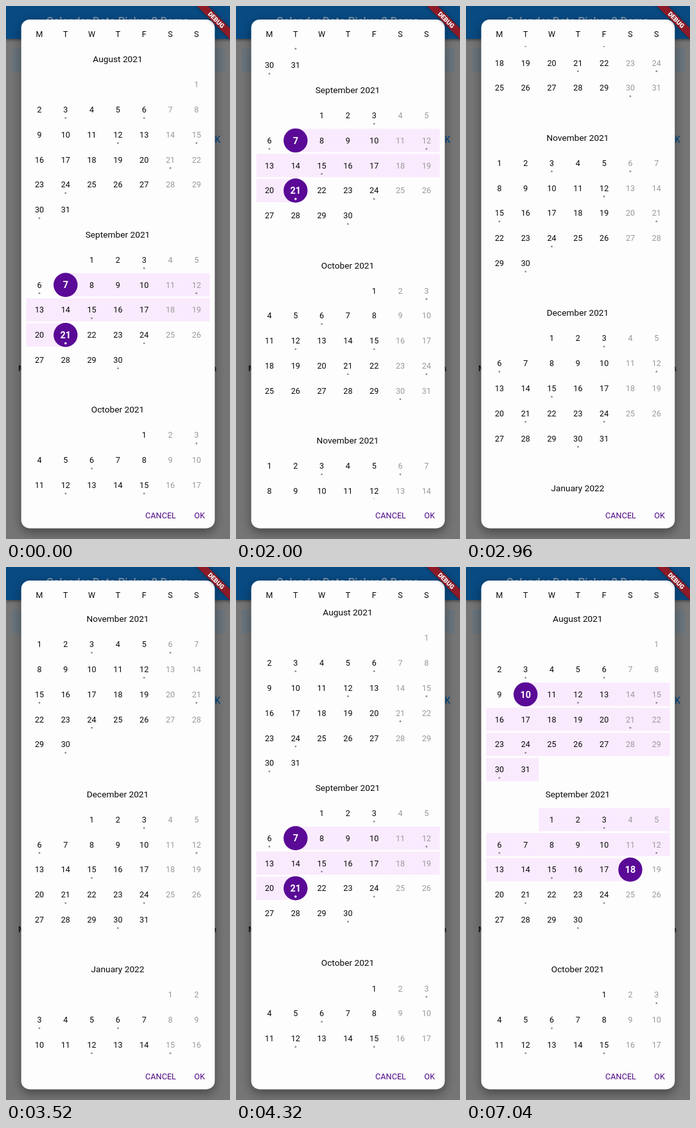
Animation, 349 px wide and 826 px high, one loop 7.2 s. Source, as an HTML page with a canvas:

```html
<!DOCTYPE html>
<html lang="en">
<head>
<meta charset="utf-8">
<title>Range calendar</title>
<style>
  html, body { margin: 0; width: 100%; height: 100%; overflow: hidden; background: #757576; }
  canvas { display: block; }
</style>
</head>
<body>
<canvas id="stage" width="349" height="826"></canvas>
<script>
const ctx = document.getElementById('stage').getContext('2d');
const LOOP = 7200, STEP = 80;
const ROW = 38.8, MONTH = ROW * 7, COL = 40.8, LEFT = 52;
const INK = '#0a0a0c', FAINT = '#9a9a9d', PURPLE = '#5a0a96', BAND = '#faeafd';

// Scroll flings: start, end, from, to, ease-out power
const flings = [
  [1520, 2400, 83, -239.7, 1.5],
  [2400, 3520, -239.7, -733.8, 2],
  [3520, 4486, -733.8, 81, 2.5]
];

// Selected ranges: time set, first day, last day
const day = (month, date) => +new Date(2021, month, date);
const ranges = [
  [0, day(8, 7), day(8, 21)],
  [4960, day(7, 10), day(7, 10)],
  [5920, day(7, 10), day(8, 18)]
];

function scrollAt(t) {
  let y = 83;
  for (const [start, end, from, to, power] of flings) {
    if (t < start) break;
    const s = Math.min(1, (t - start) / (end - start));
    y = from + (to - from) * (1 - (1 - s) ** power);
  }
  return y;
}

function rect(x, y, w, h, color) {
  ctx.fillStyle = color;
  ctx.fillRect(x, y, w, h);
}

function disc(x, y, r, color) {
  ctx.fillStyle = color;
  ctx.beginPath();
  ctx.arc(x, y, r, 0, Math.PI * 2);
  ctx.fill();
}

// Text with its capitals centred on y
function label(text, x, y, size, color, weight = 400, align = 'center') {
  ctx.font = `${weight} ${size}px Roboto, sans-serif`;
  ctx.textAlign = align;
  ctx.fillStyle = color;
  ctx.fillText(text, x, y + size * 0.356);
}

function drawPage() {
  rect(0, 0, 349, 826, '#757576');
  rect(9, 66, 332, 37, '#6a747c');
  label('OK', 334, 207, 14, '#0b497f', 500, 'right');
  label('M', 19, 561, 13.5, '#111', 500, 'left');
  label('n', 328, 561, 13.5, '#111', 500, 'right');
  ctx.save();
  ctx.shadowColor = 'rgba(0,0,0,.4)';
  ctx.shadowBlur = 4;
  ctx.shadowOffsetY = 2;
  rect(0, 0, 349, 51, '#084a82');
  ctx.restore();
  label('Calendar Date Picker 2 Demo', 174, 23, 17, '#8296a9', 500);
}

function drawDialog() {
  ctx.save();
  ctx.shadowColor = 'rgba(0,0,0,.4)';
  ctx.shadowBlur = 16;
  ctx.shadowOffsetY = 6;
  ctx.fillStyle = '#fdfdfe';
  ctx.beginPath();
  ctx.roundRect(23.7, 21, 301.6, 788.4, 13);
  ctx.fill();
  ctx.restore();
  [...'MTWTFSS'].forEach((c, i) => label(c, LEFT + i * COL, 44, 12.5, INK));
  label('CANCEL', 241, 789.5, 12.7, '#500a85');
  label('OK', 301.5, 789.5, 12.7, '#500a85');
}

function drawDay(date, x, y, first, last) {
  const time = +date, n = date.getDate();
  const picked = time === first || time === last;
  if (time >= first && time <= last && first !== last) {
    const from = time === first ? x : x - COL / 2;
    const to = time === last ? x : x + COL / 2;
    rect(from, y - 18, to - from + 0.3, 36, BAND);
  }
  if (picked) {
    disc(x, y, 18.7, PURPLE);
    label(n, x, y, 14.5, '#fff', 700);
  } else {
    label(n, x, y, 12.6, date.getDay() % 6 ? INK : FAINT);
  }
  if (n % 3 === 0 && n % 9) disc(x, y + 13, picked ? 1.8 : 1.4, picked ? '#fff' : '#8c8c8f');
}

function drawMonth(index, top, first, last) {
  const start = new Date(2021, 7 + index, 1);
  const title = start.toLocaleDateString('en-US', { month: 'long', year: 'numeric' });
  label(title, 174, top - 0.7, 13.7, INK);
  const offset = (start.getDay() + 6) % 7;
  const count = new Date(2021, 8 + index, 0).getDate();
  for (let n = 1; n <= count; n++) {
    const cell = offset + n - 1;
    const x = LEFT + cell % 7 * COL, y = top + ROW * (1 + Math.floor(cell / 7));
    drawDay(new Date(2021, 7 + index, n), x, y, first, last);
  }
}

function drawCalendar(t) {
  const [, first, last] = ranges.filter(r => r[0] <= t).pop();
  const scroll = scrollAt(t);
  ctx.save();
  ctx.beginPath();
  ctx.rect(24, 62, 301, 702);
  ctx.clip();
  for (let i = 0; i < 7; i++) {
    const top = scroll + i * MONTH;
    if (top > -MONTH && top < 780) drawMonth(i, top, first, last);
  }
  ctx.restore();
}

function drawBanner() {
  ctx.save();
  ctx.translate(349, 0);
  ctx.rotate(Math.PI / 4);
  ctx.shadowColor = 'rgba(0,0,0,.5)';
  ctx.shadowBlur = 5;
  rect(-40, 24.4, 80, 12, '#8c1a27');
  ctx.shadowBlur = 0;
  label('DEBUG', 0, 30.4, 9.8, '#fff', 900);
  ctx.restore();
}

function frame(now) {
  const t = Math.floor(now % LOOP / STEP) * STEP;
  drawPage();
  drawDialog();
  drawCalendar(t);
  drawBanner();
  requestAnimationFrame(frame);
}
frame(0);
</script>
</body>
</html>
```
